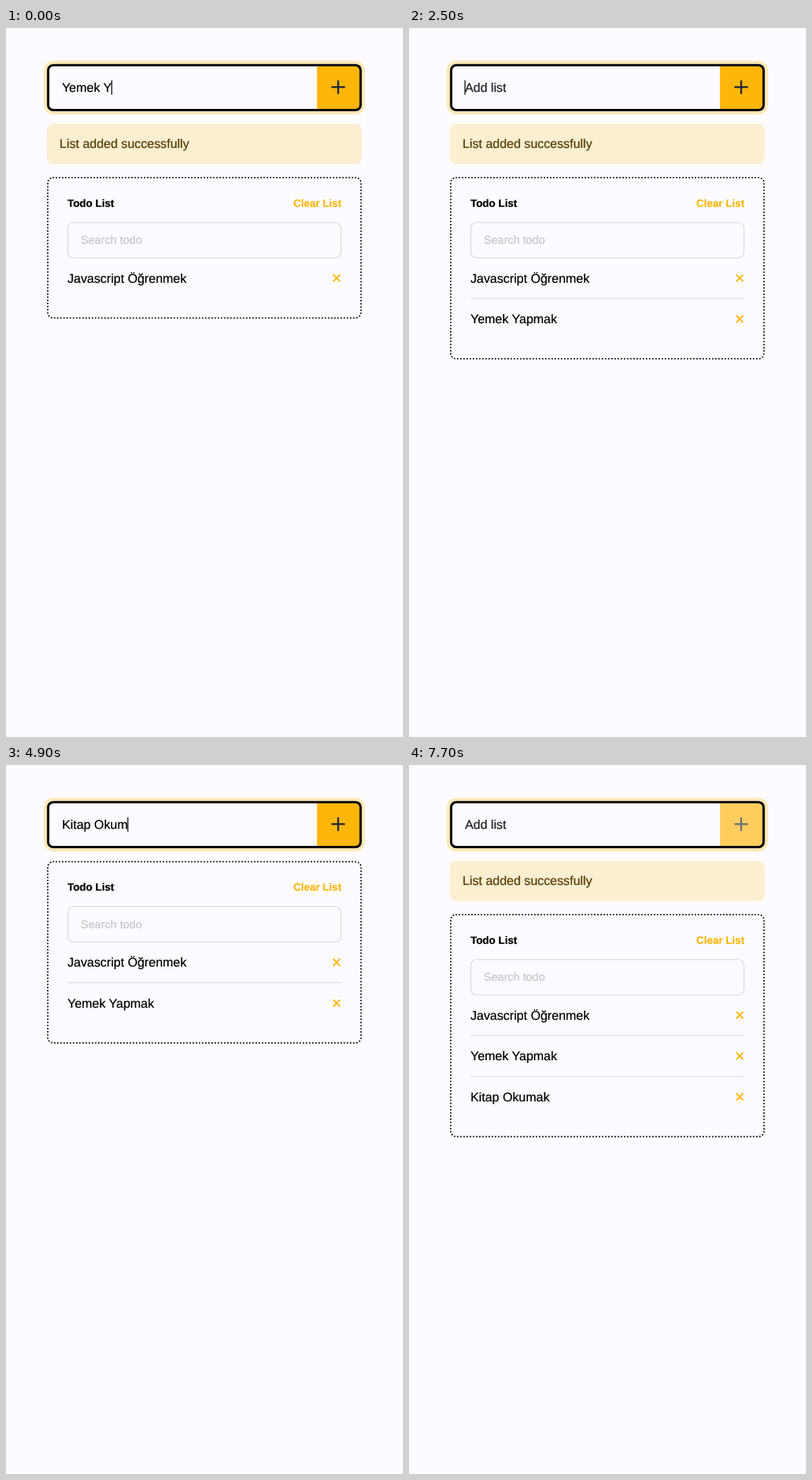
These frames come from a looping animation (560 by 999 pixels, 8 s). An HTML page:

```html
<!DOCTYPE html>
<html lang="en">
<head>
<meta charset="utf-8">
<title>Todo list</title>
<style>
  html, body { margin: 0; width: 100%; height: 100%; overflow: hidden; background: #fdfbff; }
  svg { display: block; width: 100vw; height: 100vh; }
  text {
    font: 16px "Liberation Sans", Arial, Helvetica, sans-serif;
    white-space: pre;
    text-rendering: geometricPrecision;
    fill: currentColor;
    stroke: currentColor;
    stroke-width: .22px;
  }
  .bold { font-size: 13.4px; font-weight: bold; }
  .line { fill: none; stroke: #d4d3d7; }
  .cross { fill: none; stroke: #fdb813; stroke-width: 1.9; }
</style>
</head>
<body>
<svg viewBox="0 0 504 899.1">
  <!-- entry field -->
  <rect x="48" y="41.6" width="407.7" height="68" rx="12" fill="#fde8b6"/>
  <rect x="52" y="45.6" width="399.7" height="60" rx="8" fill="#fdfbff"/>
  <g id="button">
    <path d="M394.8 47H450V104H394.8Z" fill="#ffb60a"/>
    <path d="M414 75H429.4M421.7 67.3V82.7" stroke="#212936" stroke-width="2.3" stroke-linecap="round"/>
  </g>
  <rect x="53.5" y="47.1" width="396.7" height="57" rx="6.5" fill="none" stroke="#000" stroke-width="3"/>
  <text id="entry" x="71" y="81.1"></text>
  <rect id="caret" y="66.3" width="1.2" height="18.3"/>

  <g id="alert">
    <rect x="52" y="121.6" width="399.7" height="51" rx="8" fill="#fceed0"/>
    <text x="68" y="152.4" color="#523c06">List added successfully</text>
  </g>

  <g id="panel">
    <rect id="border" x="53" y="1" width="397.7" rx="7" fill="none" stroke="#000" stroke-width="2" stroke-linecap="round"/>
    <text class="bold" x="78" y="38">Todo List</text>
    <text class="bold" x="425.8" y="38" text-anchor="end" color="#ffb60a">Clear List</text>
    <rect class="line" x="78.5" y="57.9" width="346.8" height="45" rx="7.5"/>
    <text x="95" y="85.2" color="#c6c5c9" style="font-size:14.4px">Search todo</text>
    <g id="items"></g>
  </g>
</svg>
<script>
const LOOP = 8000, STEP = 100, ROW = 51.8, BLINK = 500;
const $ = id => document.getElementById(id);

// Each entry: the text already there, then one key per listed time, then enter.
const entries = [
  { text: 'Yemek Yapmak', start: -100, ready: 7, keys: [200, 400, 700, 900, 1000], enter: 1700 },
  { text: 'Kitap Okumak', start: 1700, ready: 0,
    keys: [2800, 3000, 3200, 3400, 3600, 3900, 4200, 4400, 4700, 4900, 5100, 5200], enter: 5700 }
];
const alertHides = [100, 3900];
const todos = ['Javascript Öğrenmek', ...entries.map(e => e.text)];

$('items').innerHTML = todos.map((todo, i) => `
  <g transform="translate(0 ${i * ROW})">
    ${i ? `<path class="line" d="M78 ${154.4 - ROW}H425.8"/>` : ''}
    <text x="78" y="134.2">${todo}</text>
    <path class="cross" d="M415.4 124.1l8.8 8.8m0-8.8l-8.8 8.8"/>
  </g>`).join('');
const rows = [...$('items').children];

const show = (el, on) => el.setAttribute('visibility', on ? 'visible' : 'hidden');

// Typed text and the state of the caret at time t
function typing(t) {
  const entry = entries.find(e => t < e.enter);
  const { text, start, ready, keys } = entry || { text: '', start: 5700, ready: 0, keys: [] };
  const pressed = keys.filter(k => k <= t);
  const typed = text.slice(0, ready + pressed.length);
  const last = pressed.length ? pressed[pressed.length - 1] : start;
  const phase = Math.floor((t - last) / BLINK) % 2;
  return { typed, caret: typed ? phase === 0 : phase === 1 };
}

function drawBorder(height) {
  const w = 397.7, h = height - 2, r = 7;
  const length = 2 * (w + h) - 8 * r + 2 * Math.PI * r;
  $('border').setAttribute('height', h);
  $('border').setAttribute('stroke-dasharray', `0 ${length / Math.round(length / 4)}`);
}

function draw(time) {
  const t = Math.floor((time % LOOP) / STEP) * STEP;

  const { typed, caret } = typing(t);
  const entry = $('entry');
  entry.textContent = typed || 'Add list';
  entry.setAttribute('color', typed ? '#000' : '#202024');
  $('caret').setAttribute('x', 70.5 + (typed ? entry.getComputedTextLength() : 0));
  show($('caret'), caret);

  const added = entries.filter(e => e.enter <= t).length;
  const alerting = !(t >= alertHides[added]);
  show($('alert'), alerting);
  $('panel').setAttribute('transform', `translate(0 ${alerting ? 188.7 : 121.7})`);
  rows.forEach((row, i) => row.setAttribute('display', i <= added ? 'inline' : 'none'));
  drawBorder(180 + added * ROW);

  // hover dims the button
  const hover = Math.min(1, Math.max(0, (t - 6450) / 150));
  $('button').setAttribute('opacity', 1 - 0.34 * hover);
}

const begin = performance.now();
function tick() {
  draw(performance.now() - begin);
  requestAnimationFrame(tick);
}
tick();
</script>
</body>
</html>
```
